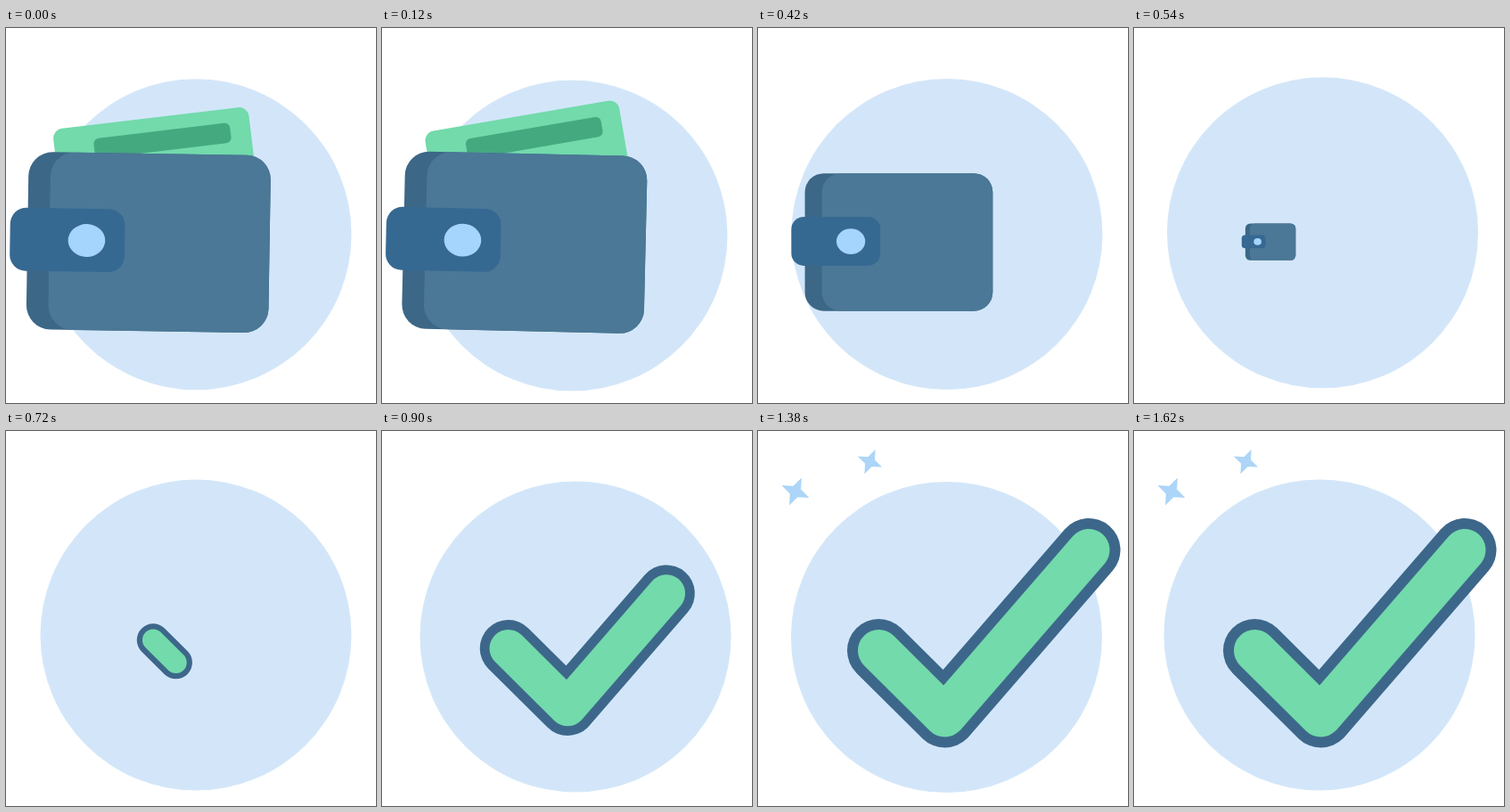
Animation, 415 px wide and 421 px high, one loop 1680 ms. Source, as an HTML page:

```html
<!DOCTYPE html>
<html lang="en">
<head>
<meta charset="utf-8">
<title>Wallet to check mark</title>
<style>
  html, body { margin: 0; width: 100%; height: 100%; overflow: hidden; background: #fff; }
  svg { display: block; width: 100vw; height: 100vh; }
  polyline { fill: none; stroke-linecap: round; stroke-linejoin: round; }
</style>
</head>
<body>
<svg viewBox="0 0 415 421">
  <circle id="disc" r="174.5" fill="#d3e6f9"/>

  <g id="wallet">
    <g id="bill">
      <rect x="-61.5" y="-113.5" width="219.5" height="115" rx="11" fill="#72daab"/>
      <rect x="-17.5" y="-98" width="153" height="22.5" rx="6" fill="#45a980"/>
    </g>
    <rect x="-126.5" y="-98.5" width="270" height="198" rx="27" fill="#3d6787"/>
    <rect x="-102" y="-98.5" width="245.5" height="198" rx="27" fill="#4b7896"/>
    <rect x="-146" y="-36" width="128" height="70.5" rx="18" fill="#366992"/>
    <ellipse cx="-60.5" cy="-.5" rx="20.7" ry="18.3" fill="#a5d4fc"/>
  </g>

  <g id="check">
    <polyline id="edge" stroke="#3d678a" stroke-width="71"/>
    <polyline id="core" stroke="#72daab" stroke-width="47"/>
  </g>

  <path id="starA" fill="#acd5f8"/>
  <path id="starB" fill="#acd5f8"/>
</svg>

<script>
const LOOP = 1680, STEP = 60;
const set = (id, attrs) => {
  const node = document.getElementById(id);
  for (const name in attrs) node.setAttribute(name, attrs[name]);
};
const show = on => on ? "visible" : "hidden";
const mix = (a, b, k) => a + (b - a) * k;
const wave = (t, peak, period) => Math.cos((t - peak) / period * 2 * Math.PI);

// Sine ease from 0 to 1 between two times.
function ease(t, from, to) {
  const q = Math.min(1, Math.max(0, (t - from) / (to - from)));
  return (1 - Math.cos(Math.PI * q)) / 2;
}

// Check mark points, relative to its scaling centre (197, 222).
const points = [[-61.5, 24.5], [12.5, 98], [174, -88.5]];

function partialCheck(k) {
  const [a, b, c] = points;
  const dist = (p, q) => Math.hypot(q[0] - p[0], q[1] - p[1]);
  const along = (p, q, f) => [mix(p[0], q[0], f), mix(p[1], q[1], f)];
  const first = dist(a, b), second = dist(b, c);
  const len = k * (first + second);
  return len <= first
    ? [a, along(a, b, len / first)]
    : [a, b, along(b, c, (len - first) / second)];
}

function drawDisc(t) {
  const sway = 5 * Math.min(1, t / 900) ** 2;
  set("disc", {
    cx: 213 + sway * wave(t, 1020, 1200),
    cy: 231.2 + 2.2 * wave(t, 200, 960)
  });
}

function drawWallet(t) {
  const size = 1.006 * (1 - ease(t, 322, 634));
  const fall = ease(t, 240, 420);
  const lift = mix(.54, 1, ease(t, 0, 240)) * (1 - fall);
  set("wallet", {
    visibility: show(t < 634),
    transform: `translate(151.3 240) rotate(${1.7 * lift}) scale(${size})`
  });
  set("bill", {
    transform: `translate(-24.5 ${-17.7 + 80 * fall - 3 * lift}) rotate(${-14.4 * lift})`
  });
}

function drawCheck(t) {
  const k = ease(t, 600, 1010);
  const line = partialCheck(k).join(" ");
  set("check", {
    visibility: show(k > 0),
    transform: `translate(197 222) scale(${mix(.4, 1, k)})`
  });
  set("edge", { points: line });
  set("core", { points: line });
}

function drawStar(id, x, y, r) {
  const corners = Array.from({ length: 8 }, (_, i) => {
    const a = (24 + i * 45) * Math.PI / 180;
    const s = i % 2 ? r * .39 : r;
    return `${x + s * Math.cos(a)} ${y + s * Math.sin(a)}`;
  });
  set(id, { d: `M${corners.join("L")}Z` });
}

function render(t) {
  drawDisc(t);
  drawWallet(t);
  drawCheck(t);
  drawStar("starA", 125.5, 34.5, 15 * ease(t, 1000, 1140));
  drawStar("starB", 42, 68, 17 * ease(t, 1040, 1320));
}

const start = performance.now();
function tick() {
  const t = (performance.now() - start) % LOOP;
  render(Math.floor(t / STEP) * STEP);
  requestAnimationFrame(tick);
}
tick();
</script>
</body>
</html>
```
